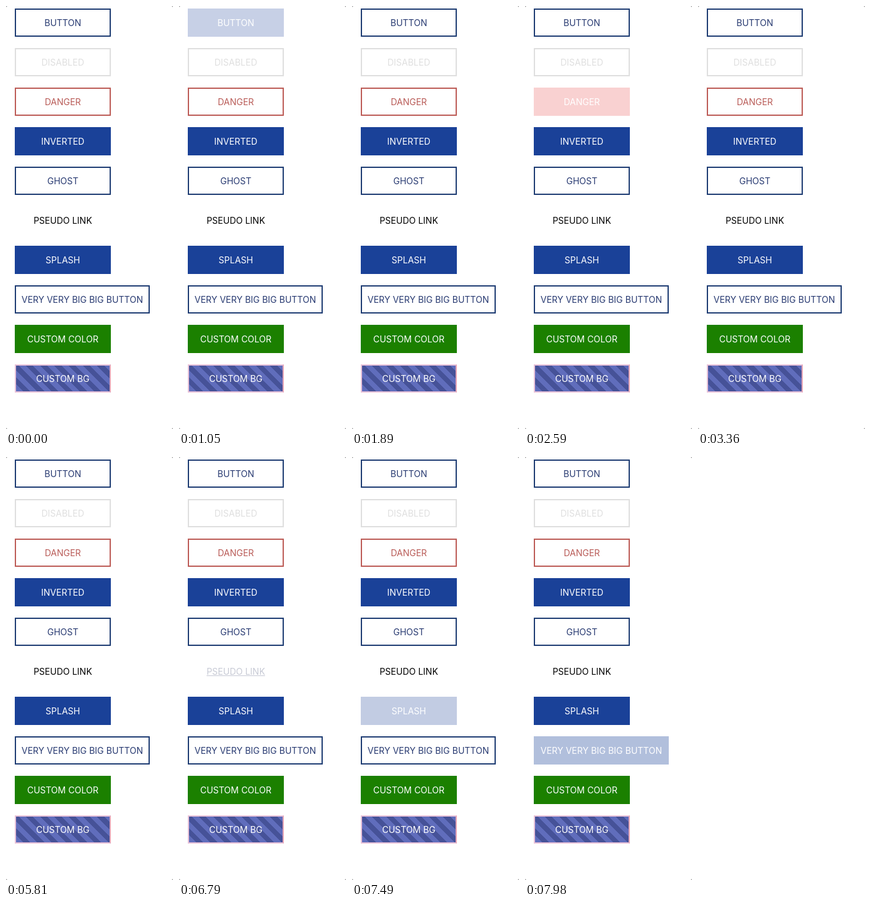
An HTML page for the animation above (8 s loop, 266 px wide and 674 px high).

```html
<!DOCTYPE html>
<html lang="en">
<head>
<meta charset="utf-8">
<style>
  html, body { margin: 0; width: 100%; height: 100%; overflow: hidden; background: #858585; }
  #stage { position: relative; width: 266px; height: 674px; background: #fff; border-radius: 3px; overflow: hidden; }
  .button {
    position: absolute; left: 14px; width: 153px; height: 45px; box-sizing: border-box;
    border: 2px solid var(--line); background: var(--fill); color: var(--ink);
    font: 400 14px/42px Inter, "Liberation Sans", sans-serif;
    text-align: center; white-space: nowrap;
  }
  .outline { --line: #203e74; --fill: #fff; --ink: #293b72; }
  .solid { --line: #1a4198; --fill: #1a4198; --ink: #fff; }
  .disabled { --line: #dfdfdf; --fill: #fff; --ink: #dfdfdf; }
  .danger { --line: #bd5d58; --fill: #fff; --ink: #b95c58; }
  .link { --line: transparent; --fill: none; --ink: #000; }
  .wide { width: 215px; }
  .green { --line: #1b8000; --fill: #1b8000; --ink: #fff; }
  .striped {
    --line: #e9c3d9; --ink: #fff; border-right-color: #e5a5b6;
    --fill: repeating-linear-gradient(45deg, #606dbc 0 8px, #465298 8px 16px);
  }
  .outline.pressed { --line: #1a4198; --fill: #1a4198; --ink: #fff; }
  .danger.pressed { --line: #e53e40; --fill: #e53e40; --ink: #fff; }
  .ghost.pressed { --line: transparent; --fill: none; --ink: #203878; }
  .link.pressed { --ink: #182350; text-decoration: underline; }
</style>
</head>
<body>
<div id="stage"></div>
<script>
const LOOP = 8000, FADE_IN = 150, FADE_OUT = 250, PRESSED_OPACITY = 0.2;

// label, style, press time, release time
const specs = [
  ['BUTTON', 'outline', 924, 1080],
  ['DISABLED', 'disabled'],
  ['DANGER', 'danger', 2464, 2620],
  ['INVERTED', 'solid', 3850, 4040],
  ['GHOST', 'outline ghost', 4190, 4390],
  ['PSEUDO LINK', 'link', 6664, 6820],
  ['SPLASH', 'solid', 7280, 7440],
  ['VERY VERY BIG BIG BUTTON', 'outline wide', 7875, 8030],
  ['CUSTOM COLOR', 'green'],
  ['CUSTOM BG', 'striped']
];

const buttons = specs.map(([label, style, press, release], row) => {
  const el = document.createElement('div');
  el.className = 'button ' + style;
  el.style.top = 4 + row * 63 + 'px';
  el.textContent = label;
  document.getElementById('stage').append(el);
  return { el, press, release };
});

const ease = u => u < 0.5 ? 2 * u * u : 1 - 2 * (1 - u) ** 2;
const progress = (time, start, length) => ease(Math.min(1, Math.max(0, (time - start) / length)));

function draw(now) {
  const time = now % LOOP;
  for (const { el, press, release } of buttons) {
    if (press === undefined) continue;
    const down = progress(time, press, FADE_IN) * (1 - progress(time, release, FADE_OUT));
    el.style.opacity = 1 - (1 - PRESSED_OPACITY) * down;
    el.classList.toggle('pressed', time >= press && time < release);
  }
}

const start = performance.now();
function tick() {
  draw(performance.now() - start);
  requestAnimationFrame(tick);
}
tick();
</script>
</body>
</html>
```
